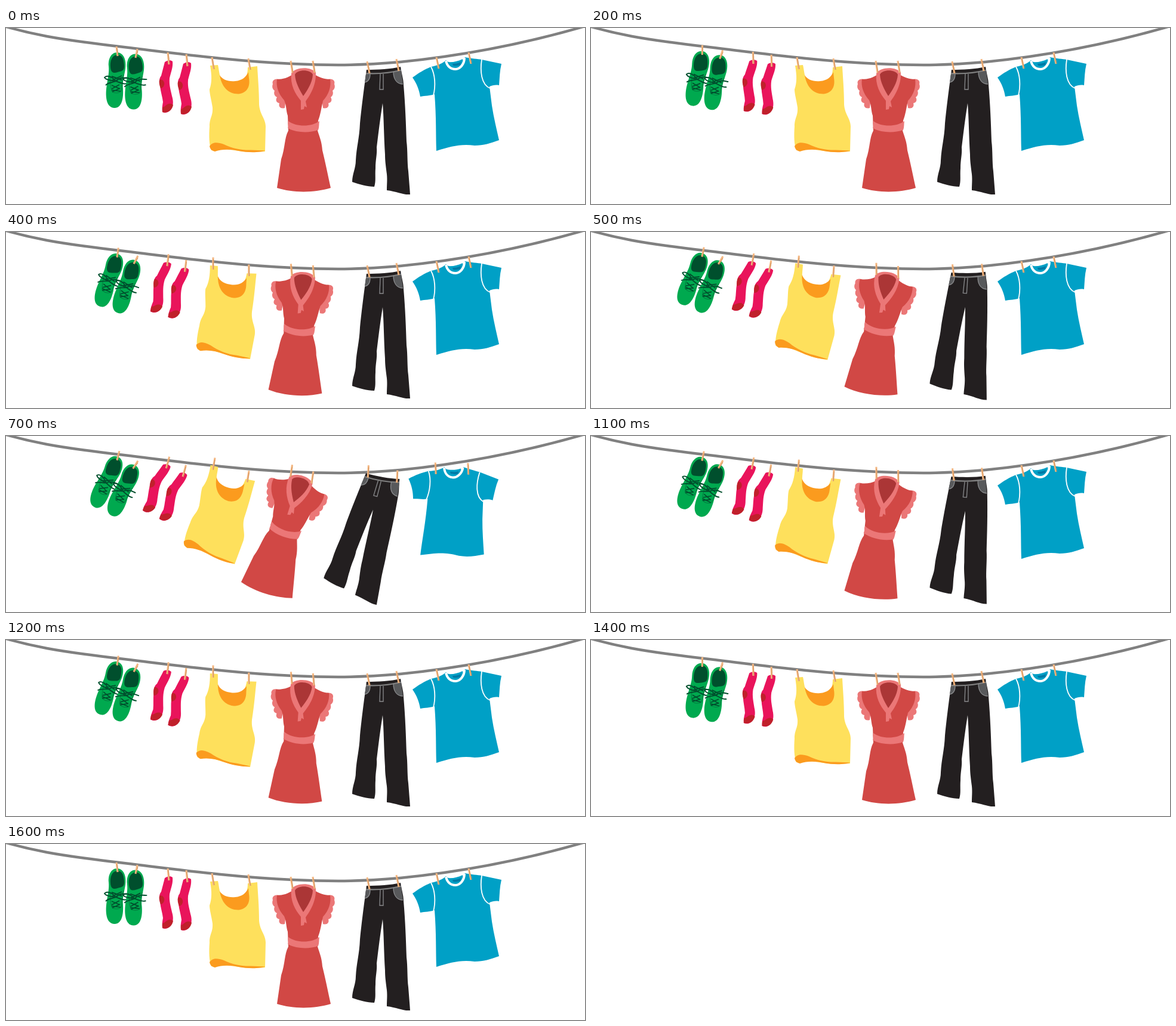
Write an HTML page with a canvas that moves like this. It is 970 px wide and 295 px high and loops after 1700 ms.

```html
<!DOCTYPE html>
<html lang="en">
<head>
<meta charset="utf-8">
<title>Clothesline</title>
<style>
html, body { margin: 0; width: 100%; height: 100%; overflow: hidden; background: #fff; }
canvas { display: block; }
</style>
</head>
<body>
<canvas id="stage" width="970" height="295"></canvas>
<script>
const ctx = document.getElementById('stage').getContext('2d');
const STEP = 100, STEPS = 17, PEAK = 8;

const fill = (color, d) => ({ color, path: new Path2D(d) });
const line = (color, width, d) => ({ color, width, path: new Path2D(d) });

const rope = line('#808080', 4.5,
  'M0-2C50 12 90 18 130 23.5S190 31 240 37.2C320 47 400 56.5 480 60S600 62 660 57C760 47 865 27.5 970-3');

const shoe = [
  fill('#00a94f', 'M186 41C176 41 171 52 172 64C173 74 171 82 169 95C166 112 167 134 182 134C194 134 197 118 196 102C195 92 197 84 199 74C203 58 199 41 186 41Z'),
  fill('#004f2d', 'M186 45C177 46 174 56 175 66C176 76 181 76 187 74C194 72 199 72 198 62C197 50 194 45 186 45Z'),
  line('#007a3d', 1, 'M174 80C176 92 174 98 178 107C184 110 189 109 193 106C195 98 194 88 197 78'),
  line('#004f2d', 1.9, 'M184 89C176 80 168 79 165 83C168 88 178 88 184 89C176 92 170 92 167 96M184 89C192 81 200 84 205 84M184 89C192 92 199 95 203 93M177 81L194 87M194 80L177 88'),
  line('#004f2d', 1.7, 'M177 96L191 102M190 95L177 102M177 104L192 106M191 101L178 107')
];

const sock = [
  fill('#e9145b', 'M266 57C270 54 276 53 279 56C280 65 277 72 274 84C273 96 276 104 278 114C281 124 280 130 277 135C273 142 267 143 262 141C261 135 262 130 263 124C262 115 259 107 258 97C256 88 257 84 260 80C262 72 264 65 266 57Z'),
  fill('#c0202b', 'M257 87C263 85 266 91 265 95C264 99 261 101 259 101C257 96 256 91 257 87Z'),
  fill('#c0202b', 'M262 133C267 132 268 128 273 127C276 126 279 128 280 129C278 138 272 143 262 141Z')
];

const tank = [
  fill('#fee05c', 'M342 63L355 62C357 70 357 78 360 84C366 93 380 95 392 91C402 87 405 78 405 66L421 64C422 84 424 104 424 128C425 145 435 152 435 165L434 207C410 209 395 207 376 204C362 202 352 206 344 205C340 195 340 180 341 165C341 150 347 148 346 133C344 120 341 110 341 103C345 92 345 80 342 63Z'),
  fill('#fb9b1e', 'M358 79C363 87 372 90 384 89C396 88 402 82 406 74L407 84C409 96 406 108 390 110.5C372 111 361 98 358 79Z'),
  fill('#fb9b1e', 'M341 198C347 190 355 192 365 195C379 202 396 205 410 204.5L434 205.5C425 209 405 209 390 206C375 203 362 203 350 207C346 206 342 204 341 198Z')
];

const dress = [
  fill('#eb7777', 'M458 86C450 84 445 88 447 94C445 99 447 103 450 105C448 110 450 114 454 116C451 121 453 125 458 126C456 132 460 136 467 134L470 110Z'),
  fill('#eb7777', 'M539 86C547 84 552 88 550 94C552 99 550 103 547 105C549 110 547 114 544 116C547 121 545 125 540 126C542 132 538 136 531 134L528 110Z'),
  fill('#d14845', 'M480 78C473 83 464 86 454 86C452 97 456 110 466 121C470 130 469 138 472 147L473 172C466 185 468 200 461 220L454 268C482 277 518 276 544 268C540 250 535 225 530 205C529 190 525 182 522 172L523 155C527 145 528 135 531 122C541 111 545 98 543 86C532 86 524 82 517 78Z'),
  fill('#eb7777', 'M478 76C484 65 512 64 519 75C520 95 510 112 502 123L504 133L500 131L499 136L494 137L494 122C484 110 476 95 478 76Z'),
  fill('#ab3636', 'M484 78C488 69 510 69 514 78C513 92 505 104 498 114C492 104 485 92 484 78Z'),
  fill('#eb7777', 'M473 156C486 166 512 166 525 156C524 161 525 166 523 171C508 176 488 176 472 168C474 164 471 160 473 156Z')
];

const trousers = [
  fill('#231f20', 'M604 70C622 70 645 69 661 65C663 78 666 86 666 95C669 130 670 160 671 190C673 205 672 225 674 240C675 253 676 265 677 279C665 280 655 274 638 272C638 262 639 255 638 245C636 230 635 222 635 212C633 180 633 150 631 126C627 150 624 175 621 200C622 212 619 220 619 235C618 248 620 256 617 266C605 266 592 262 580 258C580 245 586 235 586 222C587 200 592 185 593 160C596 130 600 100 602 85Z'),
  fill('#58595b', 'M603 77L610 77C610 85 607 90 601 91ZM649 72L662 71L665 94C654 94 649 85 649 72Z'),
  line('#808080', 2.3, 'M603 76C623 77 645 75 662 70.5'),
  line('#8a8b8d', 1.3, 'M610 77C610 85 607 90 601 91M649 73C649 85 654 94 665 94M627 77L626 103L632 103L632 77')
];

const shirt = [
  fill('#00a0c6', 'M712 65C722 63 731 60 737 54C745 62 762 61 769 49C780 51 790 52 797 53L830 60C827 72 827 84 826 96C820 95 815 96 810 98L814 130C817 150 822 170 826 188C812 193 800 197 785 197C760 194 745 199 721 206C720 180 721 150 718 111C710 114 702 113 694 115C692 103 688 93 681 83C692 75 700 70 712 65Z'),
  fill('#00a0c6', 'M739 57C748 58 757 56 765 52C765 62 757 67 752 67C746 67 741 62 739 57Z'),
  fill('#0079a5', 'M748 60C753 60 758 59 762 57L761 62C757 63 752 64 749 63Z'),
  line('#fff', 4, 'M737 55C739 64 745 69 753 69S768 60 768 50'),
  line('#fff', 1.8, 'M712 65C719 78 720 97 716 113M797 53C794 72 796 95 811 101')
];

// start: step at which the wind arrives; sway: degrees on each later step.
const garments = [
  { start: 1, pivot: [203, 41], sway: [3.7, 7.4, 11.5, 15.5, 19, 20.6, 21.7, 22],
    parts: shoe, twin: [30.5, 2.5, -1], pegs: [[185, 31, 187, 47], [220, 35, 217, 50]] },
  { start: 2, pivot: [289, 45], sway: [3.7, 8, 12.5, 16.5, 19.3, 21.3, 22],
    parts: sock, twin: [31, 3, 0], pegs: [[271, 41, 273, 61], [302, 44, 304, 64]] },
  { start: 3, pivot: [385, 58], sway: [4.6, 9.4, 14.1, 17, 18.9, 20],
    parts: tank, pegs: [[345, 49, 348, 69], [406, 51, 409, 70]] },
  { start: 4, pivot: [500, 60], sway: [4, 8.3, 13, 17.4, 19.5],
    parts: dress, pegs: [[477, 55, 480, 75], [514, 55, 517, 75]] },
  { start: 5, pivot: [633, 62], sway: [3.7, 9, 14.6, 18],
    parts: trousers, pegs: [[605, 56, 609, 76], [654, 52, 658, 72]] },
  { start: 6, pivot: [748, 36], sway: [4.5, 9.2, 13.5],
    parts: shirt, pegs: [[721, 49, 725, 68], [775, 41, 779, 60]] }
];

function paint({ color, width, path }) {
  if (width) {
    ctx.strokeStyle = color;
    ctx.lineWidth = width;
    ctx.stroke(path);
  } else {
    ctx.fillStyle = color;
    ctx.fill(path);
  }
}

function turn(degrees, x, y) {
  ctx.translate(x, y);
  ctx.rotate(degrees * Math.PI / 180);
  ctx.translate(-x, -y);
}

function segment(color, width, x1, y1, x2, y2) {
  ctx.strokeStyle = color;
  ctx.lineWidth = width;
  ctx.beginPath();
  ctx.moveTo(x1, y1);
  ctx.lineTo(x2, y2);
  ctx.stroke();
}

function drawPeg([x1, y1, x2, y2]) {
  segment('#f4b883', 3.1, x1, y1, x2, y2);
  segment('#cf8d55', 1, x1 + 1, y1 + 3, x2 + 1, y2);
}

function drawGarment({ start, pivot, sway, parts, twin, pegs }, gust) {
  ctx.save();
  turn(gust < start ? 0 : sway[gust - start], ...pivot);
  parts.forEach(paint);
  if (twin) {
    const [dx, dy, tilt] = twin;
    ctx.save();
    ctx.translate(dx, dy);
    turn(tilt, 186, 41);
    parts.forEach(paint);
    ctx.restore();
  }
  pegs.forEach(drawPeg);
  ctx.restore();
}

function draw(now) {
  const step = Math.floor(now / STEP) % STEPS;
  const gust = PEAK - Math.abs(PEAK - step);
  ctx.fillStyle = '#fff';
  ctx.fillRect(0, 0, 970, 295);
  paint(rope);
  garments.forEach(garment => drawGarment(garment, gust));
}

let origin;
function tick(now) {
  origin ??= now;
  draw(now - origin);
  requestAnimationFrame(tick);
}
draw(0);
requestAnimationFrame(tick);
</script>
</body>
</html>
```
